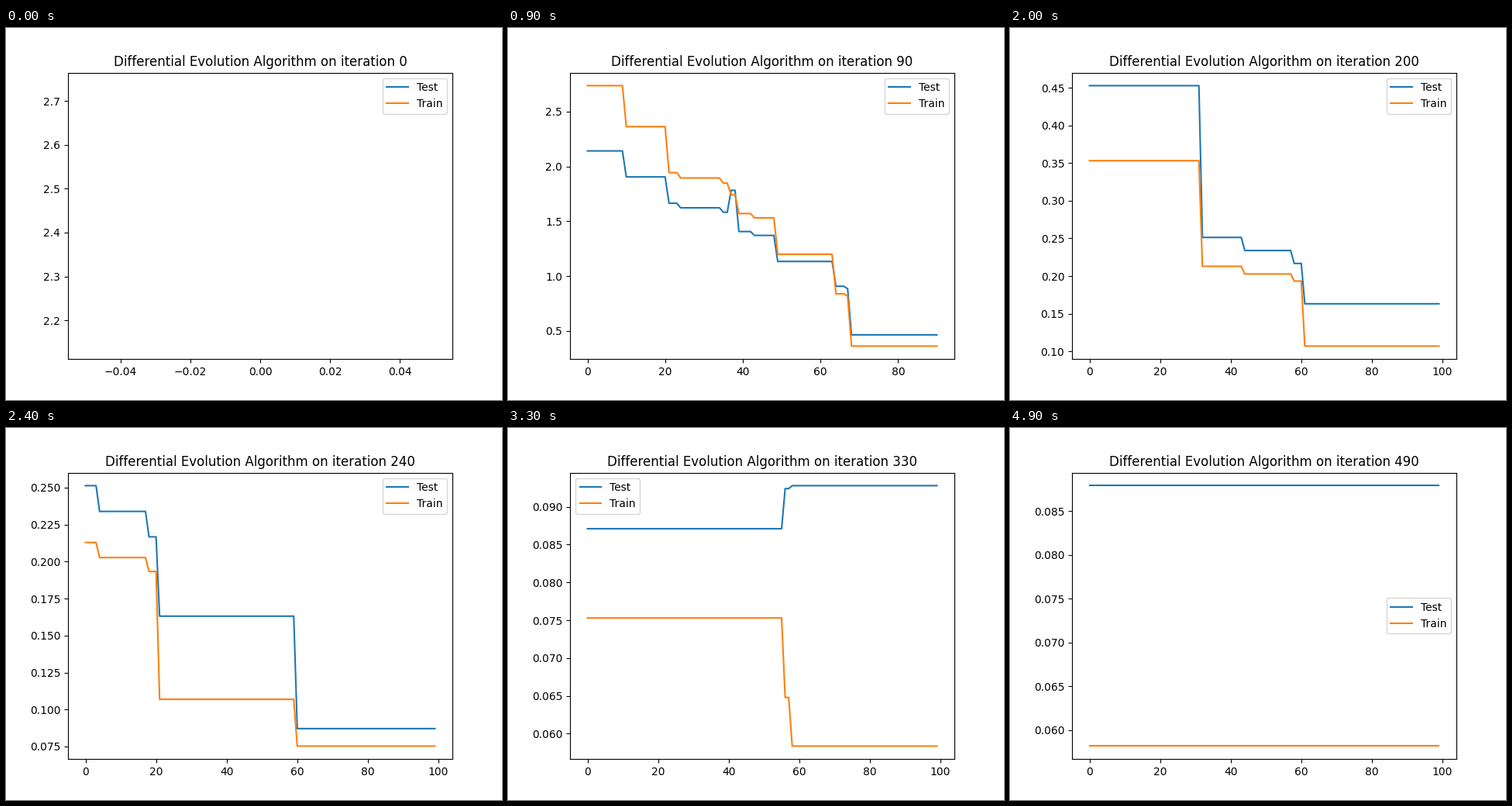
A matplotlib script that plays this animation: 640x480 px, repeating every 5.91 s.

```python
import matplotlib.pyplot as plt
import numpy as np
from matplotlib.animation import FuncAnimation

LOOP_MS, INTERVAL = 5910, 30
STEP_MS, STEP_ITERS, LAST_ITER = 100, 10, 490
WINDOW = 100

# Key improvements: iteration, test loss, train loss
JUMPS = [
    (0, 2.1409, 2.73555), (10, 1.904, 2.362), (21, 1.664, 1.943),
    (37, 1.782, 1.74), (39, 1.406, 1.57), (49, 1.1335, 1.199),
    (64, 0.9075, 0.8385), (68, 0.4646, 0.3623), (133, 0.2513, 0.2129),
    (145, 0.2339, 0.2027), (159, 0.2167, 0.1933), (162, 0.1631, 0.1069),
    (201, 0.0871, 0.0753), (287, 0.0924, 0.0648),
    (289, 0.09279, 0.05837), (387, 0.08793, 0.05815),
]
# Minor refinements trim both losses by the same factor until the next jump
REFINEMENTS = (24, 35, 43, 67, 92)
TRIM = 0.975


def loss_curves():
    starts, *levels = np.array(JUMPS).T
    its = np.arange(LAST_ITER + 1)
    jump = np.searchsorted(starts, its, side="right") - 1
    trims = np.searchsorted(REFINEMENTS, its, side="right")
    trims -= np.searchsorted(REFINEMENTS, starts[jump], side="right")
    return [level[jump] * TRIM ** trims for level in levels]


test, train = loss_curves()
fig, ax = plt.subplots(figsize=(6.4, 4.8), dpi=100)


def draw(frame):
    # Snap to the 100 ms beat that falls within this tick
    beat = (frame * INTERVAL + 20) // STEP_MS
    it = min(beat * STEP_ITERS, LAST_ITER)
    recent = slice(max(0, it + 1 - WINDOW), it + 1)
    ax.clear()
    ax.plot(test[recent], label="Test")
    ax.plot(train[recent], label="Train")
    ax.set_title(f"Differential Evolution Algorithm on iteration {it}")
    ax.legend()


anim = FuncAnimation(fig, draw, frames=LOOP_MS // INTERVAL,
                     init_func=lambda: None, interval=INTERVAL, repeat=True)
plt.show()
```
